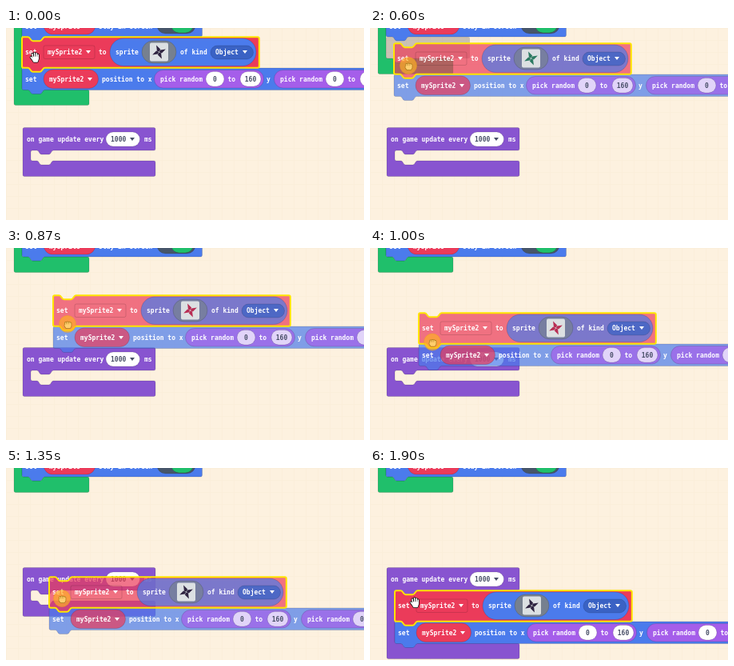
An HTML page that plays this animation: 448x240 px, repeating every 3.02 s.

```html
<!DOCTYPE html>
<html lang="en">
<head>
<meta charset="utf-8">
<title>Dragging blocks</title>
<style>
  html, body { margin: 0; width: 100%; height: 100%; overflow: hidden; background: #fdf1df; }
  svg { display: block; }
  text { font: bold 8px "DejaVu Sans Mono", "Noto Sans Mono", monospace; fill: #fff; white-space: pre; }
  text.num { fill: #474e66; }
  .block { stroke: rgba(0, 0, 0, .2); stroke-width: .7; }
  .selected { stroke: #ffe500; stroke-width: 2; stroke-linejoin: round; }
  .drag .block, .drag .selected { fill-opacity: .7; }
  .marker { fill: #000; fill-opacity: .2; }
  .hand { stroke-linecap: round; stroke-linejoin: round; }
</style>
</head>
<body>
<svg id="stage" width="448" height="240" viewBox="0 0 448 240"></svg>
<script>
const LOOP = 3020;
const BLUE = '#4b7bec', RED = '#eb3b5a', GREEN = '#20bf6b', PURPLE = '#8854d0', VIOLET = '#a55eea';

// Connector curves, drawn left to right and back
const NOTCH = 'c3 0 3 5 6 5h9c3 0 3-5 6-5';
const TAB = 'c-3 0-3 5-6 5h-9c-3 0-3-5-6-5';

const rowPath = (x, y, w, h) =>
  `M${x} ${y + 2}q0-2 2-2H${x + 7.5}${NOTCH}H${x + w - 2}q2 0 2 2V${y + h - 2}q0 2-2 2` +
  `H${x + 28.5}${TAB}H${x + 2}q-2 0-2-2Z`;

// C-shaped container: header down to innerY, mouth of innerH, then the lower arm
const cPath = (x, y, w, innerY, innerH) => {
  const end = innerY + innerH, right = x + w;
  return `M${x} ${y + 2}q0-2 2-2H${right - 2}q2 0 2 2V${innerY - 2}q0 2-2 2H${x + 38.5}${TAB}H${x + 12}q-2 0-2 2` +
    `V${end - 2}q0 2 2 2H${x + 17.5}${NOTCH}H${right - 2}q2 0 2 2V${end + 17.5}q0 2-2 2H${x + 2}q-2 0-2-2Z`;
};

const shape = (d, fill, cls = 'block') => `<path class="${cls}" d="${d}" fill="${fill}"/>`;
const pill = (x, y, w, h, fill, r = h / 2) =>
  `<rect class="block" x="${x}" y="${y}" width="${w}" height="${h}" rx="${r}" fill="${fill}"/>`;
const label = (x, y, s, cls = '') => `<text class="${cls}" x="${x}" y="${y}">${s}</text>`;
const arrow = (x, y, fill = '#fff') => `<path d="M${x - 3} ${y - 2}h6l-3 4Z" fill="${fill}"/>`;
const number = (x, w, s) =>
  pill(x, 54.5, w, 18.5, '#fff') + label(x + w / 2 - s.length * 2.41, 66.5, s, 'num');

const random = x =>
  pill(x, 52.5, 137, 22.5, VIOLET) + label(x + 7.5, 66.5, 'pick random') +
  number(x + 64.5, 23, '0') + label(x + 92, 66.5, 'to') + number(x + 107.5, 26, '160');

// Pinwheel of four hooked blades
const star = [0, 90, 180, 270].map(a =>
  `<path transform="rotate(${a})" d="M0 0L-2.6-1.6L-3.4-8.4L1.6-3.4Z"/>`).join('');

const topRow =
  shape(rowPath(20, -16, 225.5, 27), BLUE) +
  label(24, 1, 'set') + pill(47, -15, 65, 23, RED) + label(54, 1, 'mySprite') + arrow(103, -2) +
  label(116, 1, 'stay in screen') +
  pill(189, -14, 48, 21, '#47566a') + pill(207, -13, 27, 19, GREEN);

const positionRow =
  shape(rowPath(20, 50, 460, 27.5), BLUE) +
  label(24, 66.5, 'set') + pill(47, 52, 68.5, 23.5, RED) + label(54, 66.5, 'mySprite2') + arrow(105, 64) +
  label(120, 66.5, 'position to x') + random(185.5) + label(326, 66.5, 'y') + random(335.5);

const spriteRow =
  shape(rowPath(20, 11.3, 296.8, 38.5), RED, 'selected') +
  label(24, 33, 'set') + pill(47, 22, 64, 16.5, 'none', 2) + label(52, 33, 'mySprite2') + arrow(103, 30) +
  label(116, 33, 'to') + pill(130, 13, 183, 34.5, BLUE) + label(137, 33, 'sprite') +
  pill(170, 16, 43, 28, '#76808f') +
  '<rect x="180" y="18.5" width="23" height="23" rx="2" fill="#dce0e2"/>' +
  `<g id="star" transform="translate(191.5 30)">${star}<circle r=".8" fill="#dce0e2"/></g>` +
  label(218, 33, 'of kind') + pill(256, 22, 53.5, 17, '#3a62c4') + label(262, 33, 'Object') + arrow(299, 30);

const gameHeader =
  label(26, 142, 'on game update every') + pill(125, 130, 42.5, 18, '#fff') +
  label(131, 142, '1000', 'num') + arrow(158, 139, '#474e66') + label(173, 142, 'ms');

const hand = (id, d) =>
  `<g id="${id}" class="hand"><path d="${d}" fill="#000" stroke="#000" stroke-width="3"/>` +
  `<path d="${d}" fill="#fff" stroke="#fff" stroke-width="1.6"/></g>`;

const byId = id => document.getElementById(id);

byId('stage').innerHTML = `
  <defs><pattern id="grid" width="15" height="15" patternUnits="userSpaceOnUse">
    <path d="M.5 0V15M0 .5H15" stroke="#faedd9" stroke-width=".8"/></pattern></defs>
  <rect width="448" height="240" fill="#fdf1df"/>
  <rect width="448" height="240" fill="url(#grid)"/>
  <path id="loop" class="block" fill="${GREEN}"/>${topRow}
  <path id="game" class="block" fill="${PURPLE}"/>${gameHeader}
  <path id="marker" class="marker"/>
  <g id="stack">${positionRow}${spriteRow}</g>
  <g id="cursor">
    ${hand('open', 'M-2.4 0L-3-4M0 0L-.4-5.2M2.2 0V-4.6M4.2 1V-3M-2.5 3L-4.8 0M-2.5 0H4.2V2L3 5.5H-1L-2.5 3Z')}
    ${hand('fist', 'M-2.4 0V-1.5M-.2 0V-2M2 0V-1.8M3.8 1V-1M-2.8 1H3.8V2.5L2.6 4.5H-1.2L-2.8 2.5Z')}
    <circle id="press" r="10.5" fill="#ffb41e" fill-opacity=".65" stroke="#f0a020" stroke-opacity=".6" stroke-width=".8"/>
  </g>`;

// time, stack offset x y, pointer x y
const path = [
  [0, 0, 0, 36, 36.5],
  [600, 10, 8, 48, 47],
  [670, 22, 17, 60, 58],
  [730, 31, 26, 69.5, 69],
  [810, 36, 37, 75, 82],
  [870, 39, 48, 77, 95],
  [940, 41, 59, 78, 107],
  [1000, 41, 70, 78, 117.5],
  [1070, 41, 84, 78, 127],
  [1140, 40, 95, 77, 137],
  [1210, 38, 106, 75, 147],
  [1280, 36, 116, 73, 156],
  [1350, 34, 125, 70, 163],
  [1410, 31, 129, 66, 166],
  [1480, 27, 131, 63, 168],
  [1550, 23, 132, 59, 169],
  [1620, 19, 132, 56.5, 169],
  [1900, 11, 142, 56, 168]
];

const set = (id, attrs) => {
  for (const [k, v] of Object.entries(attrs)) byId(id).setAttribute(k, v);
};
const show = (id, on) => set(id, { visibility: on ? 'visible' : 'hidden' });

function draw(t) {
  const [, dx, dy, px, py] = path.findLast(p => p[0] <= t);
  const dragging = t >= 600 && t < 1900;
  const leaving = dragging && t < 870;
  const arriving = dragging && t >= 1480;

  const loopFill = t < 600 ? 66 : leaving ? 27 : 0;
  const gameFill = arriving ? 27 : t >= 1900 ? 66 : 13;
  set('loop', { d: cPath(10, -90, 94, -60, 71 + loopFill) });
  set('game', { d: cPath(21, 124.5, 166, 153, gameFill) });

  show('marker', leaving || arriving);
  set('marker', { d: arriving ? rowPath(31, 153, 105, 27) : rowPath(20, 11, 105, 27) });

  set('stack', { transform: `translate(${dx} ${dy})`, class: dragging ? 'drag' : '' });
  set('star', { fill: leaving ? '#2c7a62' : dragging && t < 1140 ? '#b82e54' : '#2f2440' });

  set('cursor', { transform: `translate(${px} ${py})` });
  show('press', t >= 400 && t < 1900);
  show('open', !dragging);
  show('fist', dragging);
}

const start = performance.now();
function tick() {
  draw((performance.now() - start) % LOOP);
  requestAnimationFrame(tick);
}
tick();
</script>
</body>
</html>
```
